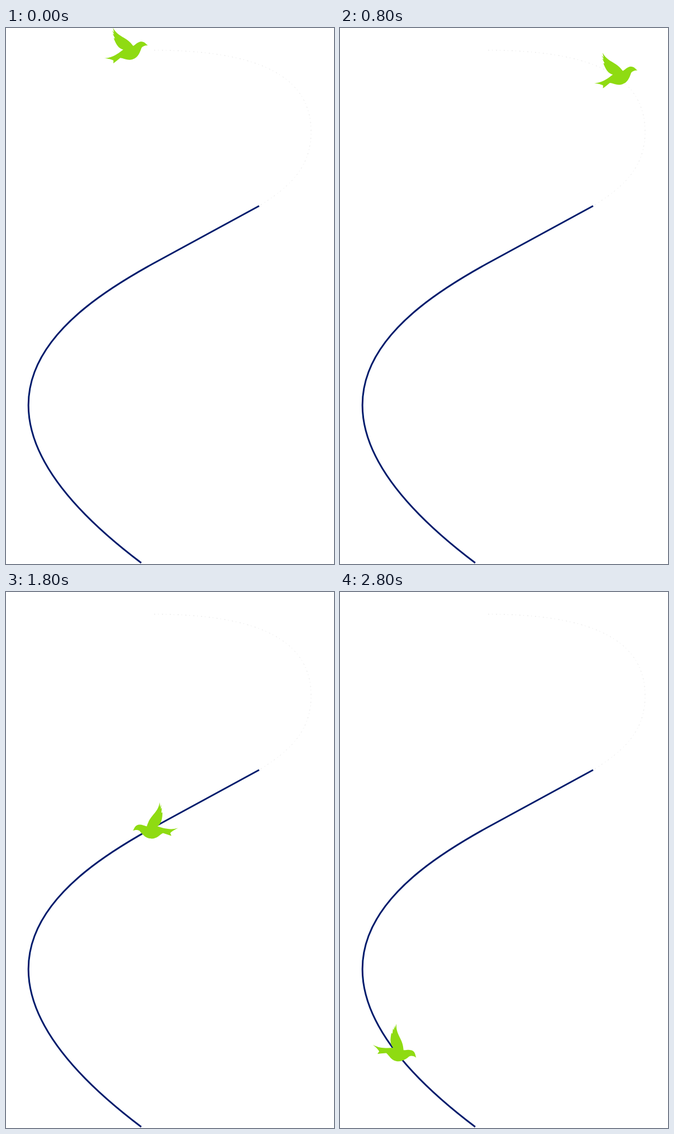
An HTML page that plays this animation: 587x955 px, repeating every 3000 ms.

```html
<!DOCTYPE html>
<html lang="en">
<head>
<meta charset="utf-8">
<title>Bird on a winding path</title>
<style>
  html, body { margin: 0; width: 100%; height: 100%; overflow: hidden; background: #fff; }
  svg { display: block; width: 587px; height: 955px; }
</style>
</head>
<body>
<svg viewBox="0 0 587 955" fill="none">
  <path d="M265 39.5C430 40 546 75 546 185C546 250 505 285 453 317"
        stroke="#dedede" stroke-width=".8" stroke-dasharray="2 5 1 6"/>
  <path d="M453 317L272 415C100 508 -135 670 242 953" stroke="#001c6c" stroke-width="3"/>
  <g id="bird">
    <path transform="translate(-40.5 -32.5)" fill="#8fdb12" d="M81 51C77 49 72 49 69 51C64 57 58 65 47 65
      C38 65 33 58 27 55L18 58L12 60L14 55C9 50 4 48 0 46C10 49 18 48 27 46L37 43C30 38 28 30 28 18
      L30 19L29 10L31 12L30 4L32 9L33 0C36 20 50 22 56 43C62 42 62 40 70 40C77 41 78 46 81 51Z"/>
  </g>
</svg>
<script>
const LOOP = 3000, STEP = 200;

// Flight path: cubic curves joined end to end, three steps each, the last one four
const flight = [
  [209.5, 27.5], [302, 21], [400, 29],
  [488, 72], [652, 111], [473, 300],
  [452.5, 307.5], [367, 351], [271, 406],
  [164.5, 463], [64.5, 531], [-28.5, 696],
  [101, 802.5]
];

function position(step) {
  const leg = Math.min(3, Math.floor(step / 3));
  const t = (step - 3 * leg) / (leg < 3 ? 3 : 4), u = 1 - t;
  const [a, b, c, d] = flight.slice(3 * leg, 3 * leg + 4);
  return [0, 1].map(k => u * u * u * a[k] + 3 * u * u * t * b[k] + 3 * u * t * t * c[k] + t * t * t * d[k]);
}

// Climb, swoop round the bend, glide level, then dip
function tilt(step) {
  if (step < 4) return -20;
  if (step < 6) return 38 - 13 * (step - 4);
  return step < 11 ? 0 : 7 + 3 * (step - 11);
}

const bird = document.getElementById('bird');

function draw(now) {
  // The first pose holds for two steps
  const step = Math.max(0, Math.floor(now % LOOP / STEP) - 1);
  const facing = step > 4 && step < 11 ? -1 : 1;
  bird.setAttribute('transform', `translate(${position(step)}) scale(${facing} 1) rotate(${tilt(step)})`);
  requestAnimationFrame(draw);
}
draw(0);
</script>
</body>
</html>
```
